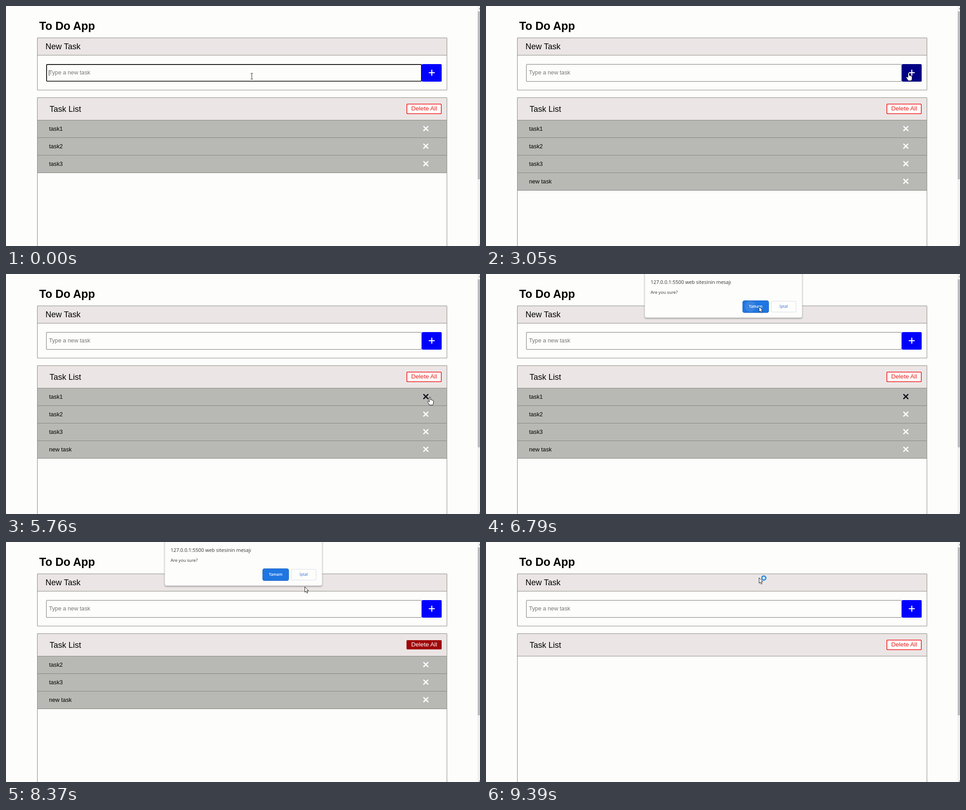
Animation, 1051 px wide and 533 px high, one loop 9470 ms. Source, as an HTML page:

```html
<!DOCTYPE html>
<html lang="en">
<head>
<meta charset="utf-8">
<title>To Do App</title>
<style>
  html, body { margin: 0; width: 100%; height: 100%; overflow: hidden; background: #fdfdfb; }
  svg { display: block; width: 1051px; height: 533px; }
  text { font-family: "Liberation Sans", Arial, sans-serif; white-space: pre; }
  #dialog text { font-family: "Open Sans", "Noto Sans", sans-serif; fill: #333; }
  #dialog .label { font-size: 8.4px; font-weight: 600; text-anchor: middle; }
  .frame { fill: none; stroke: #87877f; }
  .cross { fill: none; stroke-width: 2.7; stroke-linecap: round; }
</style>
</head>
<body>
<svg viewBox="0 0 1051 533">
  <defs>
    <filter id="shadow" x="-10%" y="-20%" width="120%" height="150%">
      <feDropShadow dx="0" dy="1.5" stdDeviation="1.8" flood-color="#000" flood-opacity=".4"/>
    </filter>
  </defs>
  <rect width="1051" height="533" fill="#fdfdfb"/>

  <text x="73.8" y="53" font-size="25" font-weight="700">To Do App</text>

  <rect x="70" y="71" width="908" height="38" fill="#ebe6e5"/>
  <path class="frame" d="M69.5 70.8H977.7V186.7H69.5ZM70 109.3H977"/>
  <text x="87.6" y="95.6" font-size="18">New Task</text>
  <rect id="field" fill="#fdfdfb"/>
  <text id="hint" x="95.2" y="152.3" font-size="12.7" fill="#757575">Type a new task</text>
  <text id="typed" x="95.5" y="152.3" font-size="10.67"></text>
  <path id="caret" stroke="#222" d="M0 143V155"/>
  <rect id="add" x="922" y="129" width="44" height="39" rx="2.5"/>
  <path d="M938.4 148.2H949.8M944.1 142.5V153.9" stroke="#fff" stroke-width="2.3" stroke-linecap="round"/>

  <rect x="70" y="204" width="908" height="50" fill="#ebe6e5"/>
  <g id="rows"></g>
  <path class="frame" d="M69.5 540V203.5H977.7V540M70 253.5H977"/>
  <text x="96.5" y="234.5" font-size="18">Task List</text>
  <rect id="wipe" rx="2" stroke-width="1.6"/>
  <text id="wipeText" x="927.2" y="232.3" font-size="13.6" text-anchor="middle">Delete All</text>

  <rect x="1045" width="6" height="533" fill="#f1f1f1"/>
  <rect x="1046" y="12" width="5" height="373" fill="#bdbdc0"/>
  <path d="M1051 4L1049 7H1051ZM1051 533L1049 530H1051Z" fill="#666"/>

  <g id="dialog">
    <rect x="352" y="-20" width="349" height="117" rx="3.5" fill="#fdfdfc" stroke="#c4c4c4" stroke-width=".6" filter="url(#shadow)"/>
    <text x="365" y="21.8" font-size="10.9">127.0.0.1:5500 web sitesinin mesajı</text>
    <text id="message" x="365" y="43.6" font-size="9.55"></text>
    <g id="cancel">
      <rect x="632.5" y="60.5" width="55" height="24" rx="2.5" fill="#fdfdfc" stroke="#dadce6"/>
      <text class="label" x="660" y="75.2" style="fill:#5b86d6">İptal</text>
    </g>
    <g id="ok">
      <rect id="ring" x="631.5" y="59.5" width="57" height="26" rx="3.5" fill="#fff" stroke="#1c66c4" stroke-width="1.6"/>
      <rect x="632" y="60" width="56" height="25" rx="2.5" fill="#1f76e2"/>
      <circle id="ripple" cx="648" cy="72" r="12" fill="#4b8ee0" opacity=".6"/>
      <text class="label" x="660" y="75.2" style="fill:#fff">Tamam</text>
    </g>
  </g>

  <g id="cursor">
    <path id="beam" d="M-2.5 -6.5H-.5L0 -6L.5 -6.5H2.5M0 -6V6M-2.5 6.5H-.5L0 6L.5 6.5H2.5" fill="none" stroke="#222"/>
    <path id="hand" d="M-1.4 1.2Q0 -.6 1.4 1.2V6.4Q3 5.4 4 7Q5.6 6.4 6.2 8Q7.8 7.8 7.8 9.6V13Q7.6 15.5 6 18H-1Q-2.6 14.5 -5 11.6Q-6 9.6 -4.2 9.2Q-2.6 9.4 -1.4 11Z" fill="#fff" stroke="#111"/>
    <path id="arrow" d="M.5 .5V12.6L3.2 10L5.2 14.6L7.2 13.7L5.2 9.2H8.9Z" fill="#fff" stroke="#222"/>
    <circle id="busy" cx="11" cy="1" r="4.4" fill="#e8f4fd" stroke="#3a93dc" stroke-width="3.2"/>
  </g>
</svg>
<script>
const LOOP = 9470;
const $ = id => document.getElementById(id);
const set = (el, attrs) => { for (const k in attrs) el.setAttribute(k, attrs[k]); };
const show = (el, on) => el.setAttribute('visibility', on ? 'inherit' : 'hidden');
const clamp = v => Math.max(0, Math.min(1, v));
const ramp = (t, a, b) => clamp((t - a) / (b - a));
const ease = p => p * p * (3 - 2 * p);
const mix = (a, b, p) => `rgb(${a.map((v, i) => Math.round(v + (b[i] - v) * p))})`;

// Screen updates come in bursts: first update, last update, count.
const bursts = [
  [2200, 3050, 12], [3490, 3800, 5], [4000, 4890, 12], [4970, 5760, 11],
  [5980, 6870, 12], [6950, 7590, 9], [7730, 8650, 12], [8720, 9140, 6], [9390, 9390, 1]
];
// Pointer stops: time, x, y.
const stops = [
  [0, 545, 156], [2120, 545, 156], [2430, 760, 131], [2680, 937, 148],
  [4130, 937, 148], [4640, 646, 68], [4920, 646, 68], [5480, 941, 284], [5700, 940, 273],
  [6130, 940, 273], [6640, 605, 72], [7000, 605, 72], [7500, 939, 230],
  [7940, 939, 230], [8450, 605, 72], [8900, 605, 72], [9130, 605, 79]
];
// Dialogs: click, opening, answer, text, single button.
const dialogs = [
  { click: 3800, open: 3960, answer: 4880, text: 'add new task', single: true },
  { click: 5970, open: 5970, answer: 6940, text: 'Are you sure?' },
  { click: 7720, open: 7780, answer: 8710, text: 'Are you sure?' }
];
const FADE = 200;
const keyTimes = [480, 610, 780, 930, 1140, 1280, 1530, 1610];
const BLUE = [0, 0, 255], NAVY = [0, 0, 133], DARK = [5, 5, 78];
const ADDED = 2880, BLUR = 2740;

function snap(t) {
  const b = bursts.filter(s => s[0] <= t + .01).pop();
  if (!b) return t;
  const step = (b[1] - b[0]) / (b[2] - 1 || 1) || 1;
  return b[0] + Math.min(b[2] - 1, Math.floor((t - b[0] + .01) / step)) * step;
}

function pointer(t) {
  const i = stops.findIndex(s => s[0] > t);
  if (i < 0) return stops[stops.length - 1].slice(1);
  const a = stops[i - 1], b = stops[i], p = ease(ramp(t, a[0], b[0]));
  return [a[1] + (b[1] - a[1]) * p, a[2] + (b[2] - a[2]) * p];
}

const rows = [0, 1, 2, 3].map(i => {
  const y = 254 + 39 * i;
  const g = document.createElementNS('http://www.w3.org/2000/svg', 'g');
  g.innerHTML = `<rect x="70" y="${y}" width="908" height="39" fill="#b8b8b5"/>
    <path class="frame" d="M70 ${y + 38.4}H977"/>
    <text x="95.5" y="${y + 23}" font-size="12.7"></text>
    <path class="cross" d="M926.3 ${y + 13.6}l9.2 9.2m0 -9.2l-9.2 9.2"/>`;
  $('rows').append(g);
  return { g, label: g.querySelector('text'), cross: g.querySelector('.cross') };
});

function drawInput(t) {
  const focus = t < BLUR;
  set($('field'), focus
    ? { x: 90, y: 129.8, width: 831.2, height: 37.2, rx: 1.5, stroke: '#000', 'stroke-width': 1.7 }
    : { x: 89.5, y: 129.5, width: 832, height: 38, rx: 1.5, stroke: '#767676', 'stroke-width': 1 });
  const count = t < ADDED ? keyTimes.filter(k => k <= t).length : 0;
  const typed = $('typed');
  typed.textContent = 'new task'.slice(0, count);
  show($('hint'), !count);
  show($('caret'), focus && (t < 230 || (t >= 480 && t < 2200)));
  const x = count ? typed.getComputedTextLength() : 0;
  set($('caret'), { transform: `translate(${Math.round(95 + x) + .5} 0)` });

  const hover = ramp(t, 2560, 2740);
  const press = ramp(t, 2760, 2860) * (1 - ramp(t, 2900, 3040)) + ramp(t, 3440, 3720);
  const held = t < dialogs[0].answer;
  set($('add'), { fill: !held || hover < 1 ? mix(BLUE, NAVY, held ? hover : 0) : mix(NAVY, DARK, press) });
}

function drawList(t, hoverX, hoverWipe) {
  let tasks = ['task1', 'task2', 'task3'];
  if (t >= ADDED) tasks.push('new task');
  if (t >= dialogs[1].answer) tasks.shift();
  if (t >= dialogs[2].answer) tasks = [];
  rows.forEach((r, i) => {
    show(r.g, i < tasks.length);
    r.label.textContent = tasks[i] || '';
    set(r.cross, { stroke: i === 0 && hoverX ? '#10101c' : '#fff' });
  });
  set($('wipe'), hoverWipe
    ? { x: 888, y: 218, width: 78, height: 20.5, fill: '#a00508', stroke: 'none' }
    : { x: 888.8, y: 217.8, width: 76.4, height: 21.4, fill: '#fdfdfb', stroke: '#f5141a' });
  set($('wipeText'), { fill: hoverWipe ? '#fff' : '#e8201f' });
}

function drawDialog(t) {
  const d = dialogs.find(d => t > d.open && t < d.answer + FADE);
  show($('dialog'), d);
  if (!d) return;
  const closing = ramp(t, d.answer, d.answer + FADE);
  const opening = ramp(t, d.open, d.open + FADE);
  const y = -9 * closing - 9 * (1 - ease(opening));
  set($('dialog'), {
    transform: `translate(0 ${y.toFixed(2)})`,
    opacity: ease(opening) * (1 - closing ** 4)
  });
  $('message').textContent = d.text;
  show($('cancel'), !d.single);
  set($('ok'), { transform: `translate(${d.single ? 0 : -62} 0)` });
  show($('ring'), !closing);
  show($('ripple'), !closing && t > d.answer - 240);
}

function draw(time) {
  const t = snap(time);
  const [x, y] = pointer(t);
  const modal = dialogs.find(d => t >= d.click && t < d.answer);
  const shown = dialogs.some(d => t > d.open && t < d.answer + FADE);
  const inside = (x0, y0, x1, y1) => x >= x0 && x < x1 && y >= y0 && y < y1;
  const overX = t > 5200 && t < 6950 && inside(918, 260, 945, 286);
  const overWipe = inside(888, 217, 966, 240);

  drawInput(t);
  drawList(t, modal ? modal === dialogs[1] : overX, modal ? modal === dialogs[2] : overWipe);
  drawDialog(t);

  const beam = !shown && inside(90, 129, 922, 168);
  const hand = !beam && !shown && (overX || overWipe || inside(922, 129, 966, 168));
  show($('beam'), beam);
  show($('hand'), hand);
  show($('arrow'), !beam && !hand);
  show($('busy'), t >= 9390);
  set($('cursor'), { transform: `translate(${Math.round(x)} ${Math.round(y)})` });
}

const start = performance.now();
function tick() {
  draw((performance.now() - start) % LOOP);
  requestAnimationFrame(tick);
}
tick();
</script>
</body>
</html>
```
